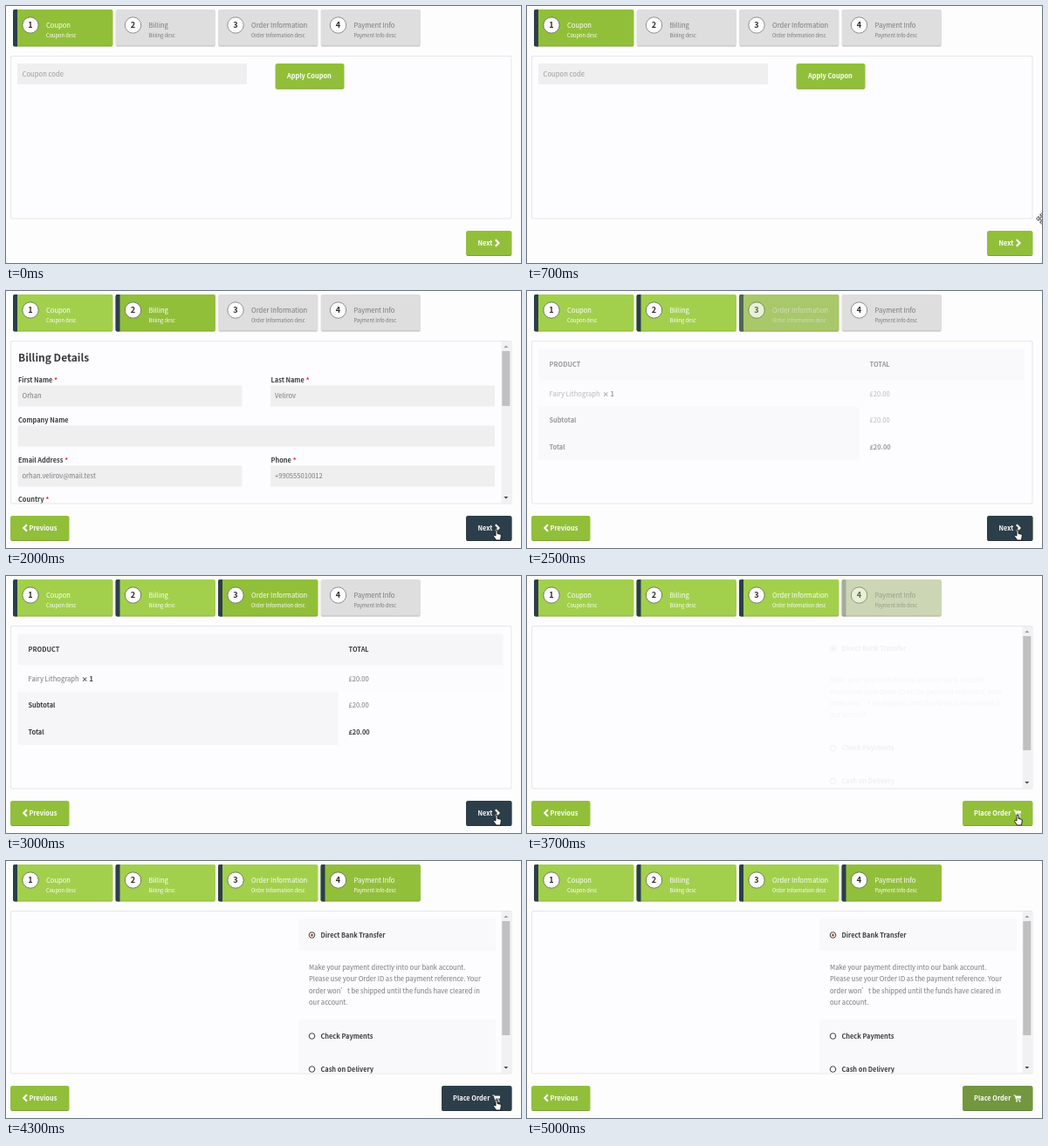
Recreate the animation shown at these times as an HTML page with a canvas. Size 590 by 295 pixels, loop 5100 ms.

```html
<!DOCTYPE html>
<html lang="en">
<head>
<meta charset="utf-8">
<title>Checkout steps</title>
<style>
html, body { margin: 0; width: 100%; height: 100%; overflow: hidden; background: #fefdfe; }
canvas { display: block; }
</style>
</head>
<body>
<canvas id="stage" width="590" height="295"></canvas>
<script>
const ctx = document.getElementById('stage').getContext('2d');
const FAMILY = '"Noto Sans CJK SC", "Noto Sans CJK JP", "Noto Sans", sans-serif';
const LOOP = 5100, TICK = 100, FADE = 600;
const GREEN = '#92bf3a', VISITED = '#a2d04c', DARK = '#2c3e4a', INK = '#3a3a3c', GREY = '#77777a', FIELD = '#f0eff0';
const STEPS = ['Coupon', 'Billing', 'Order Information', 'Payment Info'];
const STARTS = [-FADE, 1200, 2200, 3600];

const clamp = x => Math.max(0, Math.min(1, x));
const swing = x => 0.5 - Math.cos(Math.PI * clamp(x)) / 2;
const ease = x => 1 - (1 - clamp(x)) ** 2.3;

function rect(x, y, w, h, color, radius = 0) {
  ctx.fillStyle = color;
  ctx.beginPath();
  ctx.roundRect(x, y, w, h, radius);
  ctx.fill();
}

// y is the middle of the capitals; returns the end of the text
function text(s, x, y, { size = 7.6, bold = false, color = GREY, align = 'left' } = {}) {
  ctx.font = `${bold ? 700 : 400} ${size}px ${FAMILY}`;
  ctx.textAlign = align;
  ctx.fillStyle = color;
  ctx.fillText(s, x, y + size * 0.367);
  return x + ctx.measureText(s).width;
}
const strong = (s, x, y, color = INK) => text(s, x, y, { size: 7.4, bold: true, color });

function line(points, color, width, close) {
  ctx.beginPath();
  points.forEach(([x, y]) => ctx.lineTo(x, y));
  if (close) ctx.closePath();
  ctx.strokeStyle = color;
  ctx.lineWidth = width;
  ctx.stroke();
}

function circle(x, y, r, fill, stroke) {
  ctx.beginPath();
  ctx.arc(x, y, r, 0, 7);
  if (fill) { ctx.fillStyle = fill; ctx.fill(); }
  if (stroke) { ctx.strokeStyle = stroke; ctx.lineWidth = 1; ctx.stroke(); }
}

function withAlpha(alpha, draw) {
  ctx.save();
  ctx.globalAlpha = alpha;
  draw();
  ctx.restore();
}

function tabFace(i, fill, active) {
  const x = 8 + i * 117.5;
  rect(x, 4, 114.5, 42.5, fill, 2);
  rect(x + 1, 45.5, 112.5, 1, 'rgba(0,0,0,.16)');
  if (active) rect(x, 4, 5, 42.5, DARK, [2, 0, 0, 2]);
  const color = active ? '#fff' : GREY;
  text(STEPS[i], x + 38, 22, { color });
  text(STEPS[i] + ' desc', x + 38, 34, { size: 5.7, color });
  circle(x + 20, 22, 9.2, '#fdfdfd', active ? '#6f7c5c' : '#909090');
  text(i + 1, x + 20, 22, { size: 9, bold: true, color: '#2b2b2d', align: 'center' });
}

function button(x, w, label, labelX, hover = 0) {
  rect(x, 258, w, 29, GREEN, 2.5);
  withAlpha(hover, () => rect(x, 258, w, 29, DARK, 2.5));
  rect(x + 1, 286, w - 2, 1, 'rgba(0,0,0,.16)');
  strong(label, labelX, 272.3, '#fff');
}

const chevron = (x, dir) => line([[x, 268.3], [x + 3.7 * dir, 272], [x, 275.7]], '#fff', 2.1);

function cart() {
  line([[557.5, 269], [559.3, 269], [560.5, 274], [565, 274]], '#fff', 1);
  rect(560, 269.6, 6, 3, '#fff');
  circle(561, 275.7, 0.9, '#fff');
  circle(564.6, 275.7, 0.9, '#fff');
}

function scrollbar(thumbHeight) {
  rect(567.5, 58, 10.5, 185.5, '#f1f0f2');
  rect(568.3, 69, 9, thumbHeight, '#c0c0c1');
  for (const [y, dir, color] of [[64, -1, '#9a9a9a'], [237, 1, '#444']]) {
    ctx.fillStyle = color;
    ctx.beginPath();
    ctx.moveTo(570.3, y - dir);
    ctx.lineTo(575.3, y - dir);
    ctx.lineTo(572.8, y + 1.6 * dir);
    ctx.fill();
  }
}

function field(label, value, x, y, w, required = true) {
  const end = strong(label, x + 0.5, y);
  if (required) strong('*', end + 2, y, '#e02020');
  rect(x, y + 6.5, w, 24, FIELD);
  text(value, x + 5, y + 18.7);
}

function radio(label, y, checked) {
  circle(350.5, y, 3.3, '#fff', INK);
  if (checked) circle(350.5, y, 1.6, '#b5533c');
  strong(label, 360.5, y);
}

const pages = [
  function coupon() {
    rect(13, 66, 263, 24, FIELD);
    text('Coupon code', 18.5, 78, { color: '#9a9a9c', size: 7.7 });
    rect(308.5, 66, 79, 29.5, GREEN, 2.5);
    rect(309.5, 94.5, 77, 1, 'rgba(0,0,0,.16)');
    strong('Apply Coupon', 322, 80.7, '#fff');
  },
  function billing(rest) {
    ctx.transform(1, 0, 0, 1 - 0.033 * rest, 0, 9.2 * rest);
    text('Billing Details', 14, 76.5, { size: 12, bold: true, color: INK });
    field('First Name', 'Orhan', 13.5, 102, 257);
    field('Last Name', 'Velirov', 303, 102, 257);
    field('Company Name', '', 13.5, 148, 546.5, false);
    field('Email Address', 'orhan.velirov@mail.test', 13.5, 194, 257);
    field('Phone', '+990555010012', 303, 194, 257);
    field('Country', '', 13.5, 239.5, 546.5);
  },
  function order() {
    rect(13.5, 66.5, 556, 36, '#f6f5f7');
    rect(13.5, 102.5, 556, 30.5, '#fcfbfd');
    rect(13.5, 133, 367, 61, '#f6f5f7');
    strong('PRODUCT', 25.5, 84.5);
    strong('TOTAL', 392.5, 84.5);
    const end = text('Fairy Lithograph', 25.5, 118);
    strong('× 1', end + 3, 118);
    text('£20.00', 392.5, 118);
    strong('Subtotal', 25.5, 148.5);
    text('£20.00', 392.5, 148.5);
    strong('Total', 25.5, 179);
    strong('£20.00', 392.5, 179);
  },
  function payment(rest) {
    ctx.transform(1, 0, 0, 1 - 0.013 * rest, 0, -0.9 * rest);
    rect(335, 66.5, 226, 36.5, '#f9f8fa');
    rect(335, 182, 226, 64, '#f9f8fa');
    radio('Direct Bank Transfer', 85, true);
    ['Make your payment directly into our bank account.',
     'Please use your Order ID as the payment reference. Your',
     'order won’t be shipped until the funds have cleared in',
     'our account.'].forEach((s, i) => text(s, 347, 122 + i * 13.4));
    radio('Check Payments', 201);
    radio('Cash on Delivery', 239);
  }
];

// Pointer keys: time, x, y
const PATH = [[400, 590, 216], [600, 590, 216], [700, 590, 244], [800, 577, 266], [1000, 563, 280],
  [4600, 563, 280], [4700, 556, 264], [4800, 520, 190], [4900, 455, 24]];

function pointerAt(t) {
  const i = PATH.findIndex(key => key[0] > t);
  if (i === 0 || t > 4900) return null;
  const b = PATH[i < 0 ? PATH.length - 1 : i], a = PATH[(i < 0 ? PATH.length - 1 : i) - 1];
  const k = (t - a[0]) / (b[0] - a[0]);
  return [a[1] + (b[1] - a[1]) * k, a[2] + (b[2] - a[2]) * k];
}

function drawPointer(x, y) {
  ctx.save();
  ctx.translate(x, y);
  if (x < 579 && y > 258) {
    const hand = new Path2D('M-2-5.5Q-1-6.5 0-5.5V-1.5L3.5-.8Q4.5-.3 4.3 1L3.5 6H-1.5L-4.5 1.5Q-4.5 0-3 .3L-2 1.2Z');
    ctx.fillStyle = '#fff';
    ctx.strokeStyle = '#111';
    ctx.lineWidth = 0.9;
    ctx.fill(hand);
    ctx.stroke(hand);
  } else {
    for (let i = 0; i < 4; i++) {
      const arrow = [[-0.9, -1], [-0.9, -4], [-2.5, -4], [0, -6.5], [2.5, -4], [0.9, -4], [0.9, -1]];
      line(arrow, '#333', 0.9);
      ctx.rotate(Math.PI / 2);
    }
  }
  ctx.restore();
}

function hoverAt(t) {
  if (t >= 4800) return 1 - ease((t - 4800) / 500);
  return ease((t - (t >= 3700 ? 3700 : 750)) / 500);
}

function draw(t) {
  const step = STARTS.findLastIndex(start => t > start);
  const shown = swing((t - STARTS[step]) / FADE);

  rect(0, 0, 590, 295, '#fefdfe');
  STEPS.forEach((_, i) => {
    if (i < step) return tabFace(i, VISITED, true);
    if (i > step || shown < 1) tabFace(i, '#dfdedf', false);
    if (i === step) withAlpha(Math.sqrt(shown), () => tabFace(i, GREEN, true));
  });

  rect(5, 57, 574.5, 187.5, '#e7e6e8', 2);
  rect(6, 58, 572.5, 185.5, '#fdfcfe', 1.5);
  withAlpha(shown, () => {
    ctx.beginPath();
    ctx.rect(6, 58, 572.5, 185.5);
    ctx.clip();
    pages[step](1 - shown);
  });
  if (step === 1) scrollbar(63);
  if (step === 3) scrollbar(131);

  if (step > 0) {
    button(5, 67.5, 'Previous', 26.5);
    chevron(24, -1);
  }
  if (step < 3) {
    button(527, 52.5, 'Next', 540.5, hoverAt(t));
    chevron(560.8, 1);
  } else {
    button(499, 80.5, 'Place Order', 512, hoverAt(t));
    cart();
  }

  const pointer = pointerAt(t);
  if (pointer) drawPointer(...pointer);
}

function frame() {
  const t = performance.now() % LOOP;
  draw(Math.floor(t / TICK) * TICK);
  requestAnimationFrame(frame);
}
frame();
</script>
</body>
</html>
```
